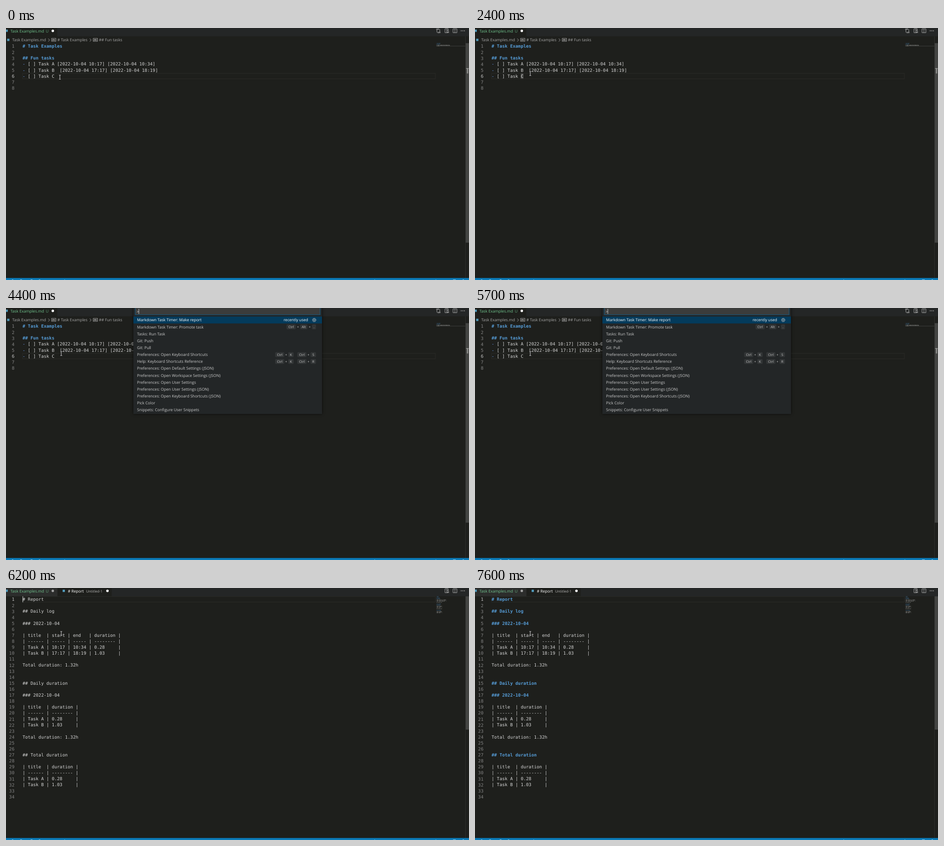
Recreate the animation shown at these times as an HTML page. Size 1014 by 552 pixels, loop 8 s.

```html
<!DOCTYPE html>
<html lang="en">
<head>
<meta charset="utf-8">
<title>Task report</title>
<style>
  html, body { margin: 0; width: 1014px; height: 552px; overflow: hidden; background: #1e1f1c; }
  svg { display: block; }
  text { white-space: pre; text-rendering: geometricPrecision; font: 8.6px "Open Sans", "Noto Sans", sans-serif; fill: #ccc; }
  .code { font: 9.66px "DejaVu Sans Mono", monospace; fill: #d4d4d4; }
  .num { fill: #858585; text-anchor: end; }
  .active { fill: #c6c6c6; }
  .head { fill: #569cd6; font-weight: bold; }
  .plain .head { fill: #d4d4d4; font-weight: normal; }
  .dash { fill: #6796e6; }
  .mini { fill: #d4d4d4; opacity: .42; }
  .mini.head { fill: #569cd6; opacity: .6; }
  .git { fill: #73c991; }
  .crumb { fill: #a9a9a9; }
  .white { fill: #fff; }
  .small { font-size: 7.75px; fill: #b5b5b5; }
  .key { font-size: 7.3px; text-anchor: middle; }
  .line { fill: none; stroke: #c5c5c5; stroke-width: .8; }
</style>
</head>
<body>
<svg width="1014" height="552" viewBox="0 0 1014 552"></svg>
<script>
const LINE = 13.106, CHAR = 5.816, LEFT = 36.2, ROW = 15.15;

const text = (x, y, s, cls = '') => `<text x="${x}" y="${y}" class="${cls}">${s}</text>`;
const rect = (x, y, w, h, fill, more = '') =>
  `<rect x="${x}" y="${y}" width="${w}" height="${h}" fill="${fill}" ${more}/>`;
const path = (d, more = '') => `<path class="line" d="${d}" ${more}/>`;
const dot = (x, fill) => `<circle cx="${x}" cy="6.3" r="2.7" fill="${fill}"/>`;
const fileIcon = (x, y) => rect(x - 2.5, y - 2.5, 5, 5, '#519aba');
const group = (id, body) => `<g id="${id}">${body}</g>`;

function editor(lines, top, current) {
  const box = top + LINE * (current - 1);
  let out = rect(LEFT, box + .5, 904, LINE - 1, 'none', 'stroke="#2b2c29"');
  lines.forEach((s, i) => {
    const y = top + i * LINE + 9.9;
    const head = s[0] === '#' ? 'head' : '';
    out += text(18.5, y + .3, i + 1, 'code num' + (i + 1 === current ? ' active' : ''));
    out += text(LEFT, y, s.replace(/^- /, '<tspan class="dash">- </tspan>'), 'code ' + head);
    for (const m of s.matchAll(/\S+/g))
      out += rect(942.7 + m.index * .58, top + .2 + i * 1.16, m[0].length * .58, .85, '#d4d4d4', `class="mini ${head}"`);
  });
  return out;
}

function crumbs() {
  const chevron = x => path(`M${x - 1.5} 23.2l3 3.2l-3 3.2`, 'stroke="#a9a9a9"');
  const symbol = x => path(`M${x} 22.7h9.5v6.5h-9.5zM${x + 2} 25.2h1.2v1.8h-1.4v-1h1.2M${x + 4.3} 24.2v2.8h1.2v-1.4h-1M${x + 7.8} 25.3h-1.2v1.7h1.2`, 'stroke-width=".6"');
  return fileIcon(5, 26) + text(13.8, 29.4, 'Task Examples.md', 'crumb') + chevron(94) +
    symbol(99.8) + text(112.4, 29.4, '# Task Examples', 'crumb') + chevron(185) +
    symbol(191) + text(203.5, 29.4, '## Fun tasks', 'crumb');
}

const firstTab = (bg, mark) => rect(0, 0, 112.3, 18.2, bg) + fileIcon(1.5, 6) +
  text(9.7, 9.6, 'Task Examples.md', 'git') + text(87, 9.6, 'U', 'git" opacity=".8') + dot(102.5, mark);

const examples = [
  '# Task Examples', '', '## Fun tasks',
  '- [ ] Task A [2022-10-04 10:17] [2022-10-04 10:34]',
  '- [ ] Task B  [2022-10-04 17:17] [2022-10-04 18:19]',
  '- [ ] Task C', '', ''];

const total = 'Total duration: 1.32h';
const summary = ['| title  | duration |', '| ------ | -------- |', '| Task A | 0.28     |', '| Task B | 1.03     |'];
const report = [
  '# Report', '', '## Daily log', '', '### 2022-10-04', '',
  '| title  | start | end   | duration |', '| ------ | ----- | ----- | -------- |',
  '| Task A | 10:17 | 10:34 | 0.28     |', '| Task B | 17:17 | 18:19 | 1.03     |', '',
  total, '', '', '## Daily duration', '', '### 2022-10-04', '', ...summary, '',
  total, '', '', '## Total duration', '', ...summary, '', ''];

const commands = [
  'Markdown Task Timer: Make report', 'Markdown Task Timer: Promote task', 'Tasks: Run Task',
  'Git: Push', 'Git: Pull', 'Preferences: Open Keyboard Shortcuts', 'Help: Keyboard Shortcuts Reference',
  'Preferences: Open Default Settings (JSON)', 'Preferences: Open Workspace Settings (JSON)',
  'Preferences: Open User Settings', 'Preferences: Open User Settings (JSON)',
  'Preferences: Open Keyboard Shortcuts (JSON)', 'Pick Color', 'Snippets: Configure User Snippets'];

function palette() {
  const key = (row, x, w, s) => {
    const y = 18.7 + row * ROW;
    return rect(x, y + 2.2, w, 10.8, '#323536', 'rx="2"') + text(x + w / 2, y + 10.3, s, 'key');
  };
  const plus = (row, x) => text(x, 29.2 + row * ROW, '+', 'key');
  const chord = (row, last) => key(row, 589.5, 20, 'Ctrl') + plus(row, 613.7) + key(row, 618, 12, 'K') +
    key(row, 638, 20, 'Ctrl') + plus(row, 662.3) + key(row, 667, 12, last);
  return rect(279, -5, 413, 237, '#232627', 'style="filter:drop-shadow(0 0 3px #000a)"') +
    rect(283, -3, 405, 17.8, '#3b3c3b', 'stroke="#0e6a9e" stroke-width=".8"') +
    text(286, 10.6, '>') + rect(279, 18.7, 413, ROW, '#043b5c') +
    commands.map((s, i) => text(287, 29.4 + i * ROW, s, i ? '' : 'white')).join('') +
    text(608, 29.4, 'recently used', 'white') +
    '<circle class="line" cx="675" cy="26.3" r="3.1"/><circle class="line" cx="675" cy="26.3" r="1.2"/>' +
    '<circle class="line" cx="675" cy="26.3" r="4.1" stroke-dasharray="1.6 1.62"/>' +
    key(1, 614.5, 20, 'Ctrl') + plus(1, 639.3) + key(1, 644, 16, 'Alt') + plus(1, 665.2) + key(1, 670, 9, '.') +
    chord(5, 'S') + chord(6, 'R') +
    group('listBar', rect(685.3, 18.7, 6.9, 13.6, '#797979', 'opacity=".45"')) +
    group('promptCaret', rect(290.4, 2, 1, 11, '#ccc'));
}

const toolbar =
  path('M961.5 1.6h7v8.8h-7zM965.5 1.6v8.8') +
  '<circle class="line" cx="967.5" cy="7.2" r="2" style="fill:#242626"/>' + path('M969 8.8l1.5 1.7') +
  path('M979 1.8h8.5v8.5h-8.5zM983.2 1.8v8.5') +
  [997, 1000.5, 1004].map(x => `<circle cx="${x}" cy="6.2" r=".85" fill="#c5c5c5"/>`).join('');

const compare = path('M943.7 4v4.5q0 1.5 1.5 1.5h3M946.8 8.4l1.6 1.6l-1.6 1.6M950 8.4v-4.5q0-1.5-1.5-1.5h-3M947 .8l-1.6 1.6l1.6 1.6') +
  '<circle class="line" cx="943.7" cy="2.8" r="1.2"/><circle class="line" cx="950" cy="9.6" r="1.2"/>';

const status = rect(0, 547.6, 1014, 5, '#0a7ab8') +
  [[13, 3], [31, 4], [54, 4], [72, 3], [128, 1], [807, 1], [941, 1], [979, 6], [1000, 3]]
    .map(([x, w]) => rect(x, 551, w, 1, '#fff', 'opacity=".6"')).join('');

const beam = 'M-2-4.6h1.3l.7.6l.7-.6h1.3M-2 4.6h1.3l.7-.6l.7.6h1.3M0-4v8';

document.querySelector('svg').innerHTML =
  rect(0, 0, 1014, 552, '#1e1f1c') + rect(0, 0, 1014, 18.2, '#242626') + toolbar +
  rect(1006, 18.2, 1, 529.4, '#2d2e2c') +
  group('examples',
    firstTab('#1e1f1c', '#fff') + compare + crumbs() +
    rect(1006.7, 33.2, 7.3, 437, '#434442') +
    rect(1007.5, 88, 6, 1.2, '#a0a09e') + rect(1009.3, 89, 3, 10.6, '#8b8b89') +
    rect(942.7, 39, 63.5, 1.1, '#3a3b39') +
    group('word', rect(LEFT + 11 * CHAR, 98.8, CHAR, LINE, '#4b4c4a')) +
    editor(examples, 33.2, 6)) +
  group('report',
    firstTab('#2c2d2c', '#a0a0a0') + rect(113, 0, 118.5, 18.2, '#1e1f1c') + fileIcon(126.5, 6.2) +
    text(135.4, 9.6, '# Report', 'white') + text(175.4, 9.6, 'Untitled-1', 'small') + dot(222.2, '#fff') +
    rect(1006.7, 18.2, 7.3, 292, '#434442') + editor(report, 18.2, 1)) +
  group('caret', rect(0, 0, 1.2, LINE, '#c4c5c3')) + status +
  group('palette', palette()) +
  group('mouse', path(beam, 'style="stroke:#000;stroke-width:2.2"') + path(beam, 'style="stroke:#fff;stroke-width:1"'));

const $ = id => document.getElementById(id);
const show = (id, on) => $(id).setAttribute('display', on ? 'inline' : 'none');
const within = (t, spans) => spans.some(([a, b]) => t >= a && t < b);
const clamp = v => Math.max(0, Math.min(1, v));
const caretOn = [[900, 1500], [1900, 2400], [2900, 3400], [3900, 4400], [5900, 6700], [7100, 7600]];

function draw() {
  const t = Math.floor(performance.now() % 8000 / 100) * 100;
  const reporting = t >= 6200;
  show('examples', !reporting);
  show('report', reporting);
  $('report').setAttribute('class', t < 6300 ? 'plain' : '');

  show('word', within(t, [[900, 4400], [5900, 6200]]));
  show('caret', within(t, caretOn));
  $('caret').setAttribute('transform', reporting ? `translate(${LEFT} 18.2)` : `translate(${LEFT + 12 * CHAR - .4} 98.7)`);

  show('palette', within(t, [[4400, 5900]]));
  show('promptCaret', !within(t, [[5100, 5600]]));
  $('listBar').setAttribute('opacity', Math.min(clamp((t - 4400) / 200), clamp((5700 - t) / 900)));

  const move = clamp((t - 200) / 200);
  $('mouse').setAttribute('transform', `translate(${118 + 3 * move} ${107.7 - 8 * move})`);
  requestAnimationFrame(draw);
}
draw();
</script>
</body>
</html>
```
